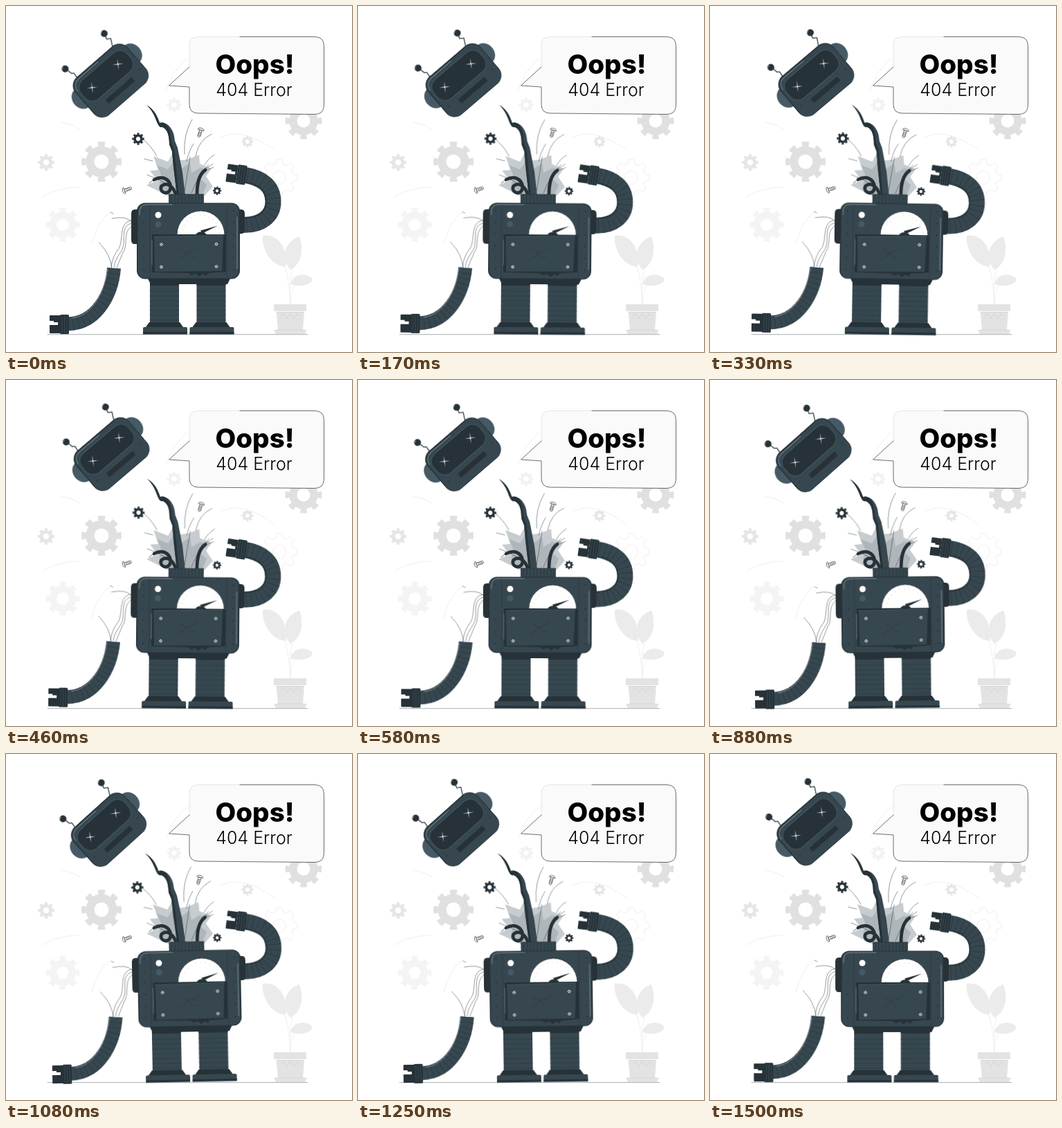
Animation of 500 by 500 pixels, one loop 1.54 s. Source, as an HTML page without scripts:

```html
<!DOCTYPE html>
<html lang="en">
<head>
<meta charset="utf-8">
<title>404 Error</title>
<style>
  html, body { margin: 0; width: 100%; height: 100%; overflow: hidden; background: #fff; }
  svg { display: block; width: 100%; height: 100%; }
  text { font-family: Inter, sans-serif; text-anchor: middle; }
  .dark { fill: #263238; }
  .mid { fill: #37474f; }
  .light { fill: #455a64; }
  .pale { fill: #ebebeb; }
  .pot { fill: #e3e3e3; }
  .line { fill: none; stroke: #263238; stroke-width: .7; stroke-linecap: round; stroke-linejoin: round; }
  .hair { stroke-width: .5; }
  .bold { stroke-width: 1.3; }
  .thick { stroke-width: 4.8; }
  .rivets { stroke-width: 2.2; stroke-dasharray: 0 17; }
  .shine { fill: none; stroke: #e6eaec; stroke-width: .6; stroke-linecap: round; }
  .faint { fill: none; stroke: #ebebeb; stroke-width: .8; }
  .tube { fill: none; stroke: #37474f; }
  .ribs { fill: none; stroke: #263238; stroke-dasharray: .6 7; }
  .robot { transform-origin: 230px 255px; animation: sway 770ms linear -443ms infinite alternate; }
  @keyframes sway {
    from { transform: rotate(-1.15deg); }
    to { transform: rotate(.85deg); }
  }
</style>
</head>
<body>
<svg viewBox="0 0 500 500">
  <defs>
    <g id="gear" fill="none" stroke="currentColor">
      <circle r="5.700" stroke-width="4.200"/>
      <circle r="8.600" stroke-width="2.800" pathLength="16" stroke-dasharray="1 1" transform="rotate(-11.250)"/>
    </g>
    <path id="tooth" d="M-8 -18.500L-5 -20L-4 -26H4L5 -20L8 -18.500"/>
    <g id="teeth2"><use href="#tooth"/><use href="#tooth" transform="rotate(45)"/></g>
    <g id="teeth4"><use href="#teeth2"/><use href="#teeth2" transform="rotate(90)"/></g>
    <g id="bolt" fill="#fff" stroke="#263238" stroke-width=".7">
      <path d="M-2 -2V8L0 9.500L2 8V-2ZM-2 2L2 1M-2 4.500L2 3.500M-2 7L2 6"/>
      <path d="M-4.800 -2C-4.500 -6 4.500 -6 4.800 -2Z"/>
    </g>
    <g id="screw">
      <circle r="2.600" fill="#dfe3e5" stroke="#263238" stroke-width=".6"/>
      <path class="line" d="M-1.300 -1.300L1.300 1.300M1.300 -1.300L-1.300 1.300"/>
    </g>
    <path id="spark" d="M0 -8L.5 -.5L8 0L.5 .5L0 8L-.5 .5L-8 0L-.5 -.5Z" fill="#fff"/>
    <g id="leg">
      <path class="mid" d="M0 400H42V460H0Z"/>
      <path class="dark" d="M0 400H42V404H0Z"/>
      <path class="line hair" d="M0 412H42M0 419H42M0 426H42M0 433H42M0 440H42M0 447H42M0 454H42"/>
      <path class="dark" d="M-1 457H43L48 464H-6Z"/>
      <path class="mid" d="M-10 474V466Q-10 464 -8 464H52Q54 464 54 466V474Z"/>
      <path class="dark" d="M-10 471H54V474.500H-10Z"/>
    </g>
    <g id="hand">
      <path class="dark" d="M-15 -12Q-15 -13 -14 -13H0V13H-14Q-15 13 -15 12V1H-3V-3H-9V-5H-15Z"/>
      <rect class="dark" y="-14" width="13" height="28" rx="1.500"/>
      <path d="M3 -13V13M6.500 -13V13M10 -13V13" stroke="#455a64" stroke-width=".6"/>
    </g>
  </defs>

  <!-- background gears -->
  <use href="#gear" transform="translate(138 225) scale(2.9)" color="#e0e0e0"/>
  <use href="#gear" transform="translate(58 226) scale(1.2)" color="#e6e6e6"/>
  <use href="#gear" transform="translate(82 316) scale(2.45)" color="#f4f4f4"/>
  <use href="#gear" transform="translate(243 143) scale(1.05)" color="#f2f2f2"/>
  <use href="#gear" transform="translate(349 196) scale(.85)" color="#e6e6e6"/>
  <use href="#gear" transform="translate(430 166) scale(2.65)" color="#e0e0e0"/>
  <g class="faint" transform="translate(395 248)">
    <use href="#teeth4"/><use href="#teeth4" transform="rotate(180)"/>
    <circle r="9.500"/>
  </g>
  <path class="faint" d="M52 276Q76 262 106 262M80 168Q96 170 108 179M310 190Q340 174 388 208M231 122Q239 95 263 75M124 344Q132 312 150 298"/>

  <!-- plant -->
  <g class="pale">
    <path d="M404 377C384 376 369 352 371 332C391 328 408 348 404 377Z"/>
    <path d="M411 381C396 366 402 340 424 333C431 352 427 373 411 381Z"/>
    <path d="M411 402C414 387 433 384 443 394C441 405 423 406 411 402Z"/>
  </g>
  <path class="faint" d="M396 352Q410 392 411 431M419 350Q408 400 411 431M436 395Q410 398 411 431"/>
  <path class="pot" d="M387 431H434V441H387ZM390.500 442H431L429 468H393ZM387 468H435L432 474H390Z"/>
  <path d="M391 442.500H430M396 449L401 444L406 452L411 444L416 452L421 444L426 449M390 468H432" fill="none" stroke="#d2d2d2" stroke-width=".8"/>
  <path class="line hair" d="M60 474.700H436" stroke-opacity=".8"/>

  <!-- speech bubble -->
  <path d="M278 44.500H446Q459.500 44.500 459.500 58V143Q459.500 156.500 446 156.500L278 155Q265 155 265 142V117L235.500 115L265 88V57Q265 44.500 278 44.500Z" fill="#fafafa"/>
  <path d="M265 88V57Q265 44.500 278 44.500H338" fill="none" stroke="#ccc" stroke-width=".5"/>
  <path class="line" d="M338 44.500H446Q459.500 44.500 459.500 58V143Q459.500 156.500 446 156.500L278 155Q265 155 265 142V117L235.500 115L265 88"/>
  <text x="359.500" y="97.500" font-size="38.500" font-weight="800">Oops!</text>
  <text x="358.500" y="130" font-size="25" font-weight="300">404 Error</text>

  <g class="robot">
    <!-- blast -->
    <path d="M235 275L203 259L219 252L208 238L220 237L213 217L234 225L241 212L250 223L262 222L279 215L280 228L297 235L289 246L299 261L286 275Z" fill="#c6cccf"/>
    <path d="M237 275L221 258L226 248L218 230L234 236L243 224L252 236L266 227L268 241L282 233L280 249L290 258L283 275Z" fill="#aeb6ba"/>
    <path class="line hair" d="M197 192Q210 202 218 217M200 221L212 224M269 164Q256 185 258 214M271 199Q264 210 261 224M297 185Q278 194 274 217M301 215Q291 221 287 230M204 244Q219 249 232 257M266 218L258 268M284 235L268 270"/>
    <path class="line thick" d="M214 251C229 243 241 254 237 266C232 275 220 267 225 260C232 254 242 260 246 274"/>
    <path class="line" d="M215 250L207 256"/>
    <path class="line thick" d="M276 274C276 255 279 244 288 237"/>
    <path class="line hair" d="M287 237L299 228M288 238L300 233M287 236L293 229"/>
    <path class="mid" d="M203 143C215 150 219 160 222 169C232 166 241 177 243 188L244 195L248 205L255 240L259 274H247L242 232L240 210L236 200C236 189 234 178 226 175C217 177 219 157 203 143Z"/>
    <path class="dark" d="M203 143C215 150 219 160 222 169C232 166 238 176 239 198L243 208L250 274H247L242 232L240 210L236 200C236 189 234 178 226 175C217 177 219 157 203 143Z"/>
    <use href="#gear" transform="translate(191 192) scale(.87)" color="#263238"/>
    <use href="#gear" transform="translate(305 267) scale(.62)" color="#263238"/>
    <use href="#bolt" transform="translate(281 181) rotate(17) scale(.95)"/>
    <use href="#bolt" transform="translate(173 266) rotate(-110) scale(.95)"/>

    <!-- loose wires -->
    <path class="line hair" d="M182 310C160 312 172 342 161 353C156 360 153 368 152 378M182 314C162 318 176 342 166 355C160 364 157 370 156 378M182 318C168 326 177 346 169 356L160 378M137 345Q150 358 153 378M135 342L136 344M181 311Q173 303 153 307M151 298L155 300"/>

    <!-- arms -->
    <path class="tube" stroke-width="20" d="M156 379C153 415 132 459 89 459.500"/>
    <path class="ribs" stroke-width="20" d="M156 379C153 415 132 459 89 459.500"/>
    <path class="shine" d="M147 380C143 412 126 447 96 451" stroke-opacity=".7"/>
    <use href="#hand" transform="translate(78 460)"/>
    <path class="tube" stroke-width="23" d="M340 316C369 318 386 303 386 283C386 260 370 248 343 244"/>
    <path class="ribs" stroke-width="23" d="M340 316C369 318 386 303 386 283C386 260 370 248 343 244"/>
    <path class="line bold" d="M342 306C365 307 376 298 376 283C376 266 364 257 347 255"/>
    <use href="#hand" transform="translate(334 243) rotate(8)"/>

    <!-- legs -->
    <use href="#leg" x="208"/>
    <use href="#leg" x="275.500"/>
    <path class="dark" d="M204 392H325L320 402H209Z"/>

    <!-- body -->
    <path class="dark" d="M191 294H186Q181 294 181 300V338Q181 344 186 344H191ZM337 294H340Q345 294 345 300V324Q345 329 340 329H337Z"/>
    <path class="mid" d="M235 273Q235 272 236 272H285Q286 272 286 273V286H235Z"/>
    <path class="line" d="M239 273V285M244 273V285M249 273V285M254 273V285M259 273V285M264 273V285M269 273V285M274 273V285M279 273V285M283 273V285M235 272H286"/>
    <rect class="dark" x="189" y="284.500" width="149" height="110" rx="12"/>
    <rect class="mid" x="190.500" y="285.500" width="146" height="108" rx="11"/>
    <path class="line hair" d="M208 287V393M319 287V393"/>
    <path class="shine" d="M193 302V298Q193 287 203 287H240M334 305V380" stroke-opacity=".65"/>
    <path class="line rivets" d="M199 296V388M329 296V388"/>
    <circle cx="220" cy="302" r="4.500" fill="#fff"/>
    <circle class="light" cx="220" cy="315.500" r="4.500"/>
    <path d="M247 331A34.500 35 0 0 1 316 331Z" fill="#fff" stroke="#263238" stroke-width=".8"/>
    <path d="M254 330A27.500 28 0 0 1 309 330" fill="none" stroke="#d9c9c9" stroke-width="2.500" stroke-dasharray=".5 6.500"/>
    <path class="dark" d="M306 317.500L284 328.500L281 324.500ZM274 331A8.500 7 0 0 1 290 331Z"/>
    <path class="dark" d="M211 330H318V384L292 386L289 390L285 387L279 391L275 387L268 389L264 386L211 385Z"/>
    <path class="mid" d="M214 334L314 332L312 383L215 384Z"/>
    <path class="light" d="M214 333L314 331V332L214 334Z"/>
    <path class="line hair" d="M250 351L261 357L270 354L278 349M261 357L256 363L249 367M261 357L268 364L273 363M316 337V380"/>
    <path class="shine" d="M211 338V374" stroke-opacity=".5"/>
    <use href="#screw" x="224.500" y="344.500"/>
    <use href="#screw" x="304" y="344"/>
    <use href="#screw" x="224.500" y="377"/>
    <use href="#screw" x="304" y="376.500"/>

    <!-- head -->
    <g transform="translate(151.300 107.800) rotate(-41)">
      <path class="line bold" d="M-38 -56L-36 -45L-33 -43L-34 -34M37 -56L35 -49L40 -46L34 -35"/>
      <circle class="dark" cx="-38.500" cy="-56" r="5"/>
      <circle class="dark" cx="37.500" cy="-57.500" r="5"/>
      <path class="shine" d="M-42 -58Q-41 -60 -39 -60M34 -60Q35 -62 37 -62"/>
      <ellipse class="light" cx="-49" cy="-8" rx="13" ry="16"/>
      <ellipse class="light" cx="49" cy="-9" rx="13" ry="16"/>
      <rect class="dark" x="-50" y="-36" width="100" height="72" rx="16"/>
      <rect class="mid" x="-48.500" y="-34.500" width="97.500" height="70" rx="15"/>
      <rect class="light" x="-45" y="-28" width="89" height="37" rx="15"/>
      <rect class="dark" x="-44" y="-27" width="87" height="35" rx="14"/>
      <rect class="dark" x="-24" y="16" width="50" height="7.500" rx="1"/>
      <path class="shine" d="M-46 -20Q-45 -32 -33 -32.500H4" stroke-opacity=".6"/>
      <path class="line rivets" d="M-41 15V32M42 15V32"/>
      <use href="#spark" transform="translate(-27 -10) rotate(34)"/>
      <use href="#spark" transform="translate(23.500 -11) rotate(34)"/>
    </g>
  </g>
</svg>
</body>
</html>
```
